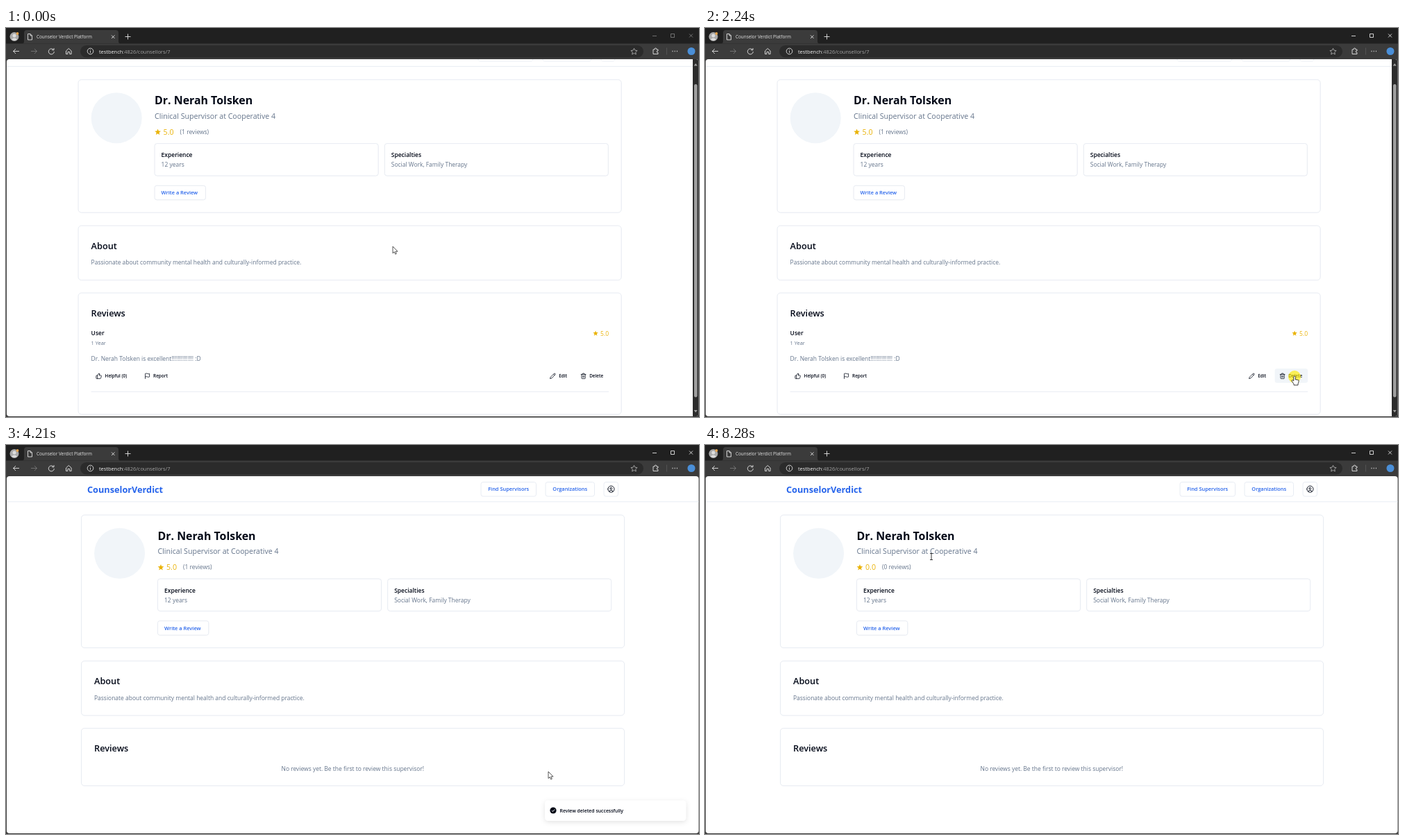
Recreate the animation shown at these times as an HTML page. Size 998 by 561 pixels, loop 8420 ms.

```html
<!DOCTYPE html>
<html lang="en">
<head>
<meta charset="utf-8">
<title>Counselor Verdict Platform</title>
<style>
  html, body { margin: 0; width: 100%; height: 100%; overflow: hidden; background: #3b3b3b; }
  svg { display: block; font-family: "Open Sans", "Noto Sans", sans-serif; fill: #020817; }
  .icon { fill: none; stroke: #020817; stroke-width: 2; stroke-linecap: round; stroke-linejoin: round; }
  .chrome { fill: none; stroke: #e4e4e4; stroke-width: .9; stroke-linejoin: round; }
  .card { filter: drop-shadow(0 .6px .6px #0000000d); }
  .toast { filter: drop-shadow(0 2px 3.5px #0000001c); }
</style>
</head>
<body>
<svg id="stage" width="998" height="561" viewBox="0 0 998 561"></svg>
<script>
const LOOP = 8420;
const MUTED = '#64748b', BLUE = '#2563eb', GOLD = '#eab308', LINE = '#e2e8f0', HOVER = '#f1f5f9';
const PERSON = 'Dr. Nerah Tolsken';
const HOST = 'testbench', LIST_PATH = ':4826/counsellors';

// Text sizes are in the site's own pixels; the screen is shown reduced.
const text = (x, y, size, str, attrs = '') =>
  `<text x="${x}" y="${y}" font-size="${size * .53}" ${attrs}>${str}</text>`;
const bold = (x, y, size, str, attrs = '') => text(x, y, size, str, 'font-weight="600" ' + attrs);
const fill = color => `fill="${color}"`;
const rect = (x, y, w, h, r, attrs) =>
  `<rect x="${x}" y="${y}" width="${w}" height="${h}" rx="${r}" ${attrs}/>`;
const box = (x, y, w, h, r = 3.5, attrs = 'class="card"') =>
  rect(x, y, w, h, r, `fill="#fff" stroke="${LINE}" stroke-width=".8" ${attrs}`);
const icon = (x, y, d, scale = .38) =>
  `<path class="icon" transform="translate(${x} ${y}) scale(${scale}) translate(-12 -12)" d="${d}"/>`;
const star = (x, y, scale) =>
  `<path fill="${GOLD}" transform="translate(${x} ${y}) scale(${scale}) translate(-12 -12)"
    d="M12 1l3 7.6 8 .6-6.2 5.2 2 7.8L12 18l-6.8 4.2 2-7.8L1 9.2l8-.6z"/>`;
const line = (x1, x2, y) => `<path d="M${x1} ${y}H${x2}" stroke="${LINE}" stroke-width=".8"/>`;
const group = (id, body, attrs = '') => `<g id="${id}" ${attrs}>${body}</g>`;

const THUMB = 'M7 10v12M15 6l-1 4h6a2 2 0 0 1 2 2.5l-2.5 8A2 2 0 0 1 17.5 22H4a2 2 0 0 1-2-2v-8a2 2 0 0 1 2-2h3l5-8a3 3 0 0 1 3 4z';
const FLAG = 'M4 22V3s1-1 4-1 5 2 8 2 4-1 4-1v12s-1 1-4 1-5-2-8-2-4 1-4 1';
const PENCIL = 'M21.2 6.8a1 1 0 0 0-4-4L3.8 16.2 2 22l5.8-1.8zM15 5l4 4';
const TRASH = 'M3 6h18M19 6v14q0 2-2 2H7q-2 0-2-2V6M8 6V4q0-2 2-2h4q2 0 2 2v2M10 11v6M14 11v6';
const ACCOUNT = 'M2 12a10 10 0 1 0 20 0a10 10 0 1 0-20 0M9 10a3 3 0 1 0 6 0a3 3 0 1 0-6 0M6.5 20q0-4 3.5-4h4q3.5 0 3.5 4';

const browser = `
  <rect width="998" height="561" fill="#3b3b3b"/>
  <rect width="998" height="22.5" fill="#202020"/>
  <path d="M23 22.5q3 0 3-3V7q0-4 4-4H158q4 0 4 4V19.5q0 3 3 3z" fill="#3b3b3b"/>
  <circle cx="12" cy="12.5" r="6.5" fill="#a9a9a9"/><circle cx="12" cy="11" r="2.5" fill="#ddd"/>
  <path d="M8 16.500q4-4 8 0-4 3-8 0z" fill="#ddd"/><circle cx="16.500" cy="8" r="1.900" fill="#e3a34e"/>
  <g class="chrome">
    <path d="M31.500 8.500h3.500l2.500 2.500v6h-6zM35 8.500v2.500h2.500"/>
    <path d="M152 10.500l4.500 4.500M156.500 10.500l-4.500 4.500M171.500 12.500h8M175.500 8.500v8"/>
    <path d="M19 33.500h-8.500M14 30l-3.500 3.500 3.500 3.500"/>
    <path d="M36 33.500h8.500M41 30l3.500 3.500-3.500 3.500" stroke="#777"/>
    <path d="M68.500 31.500a4 4 0 1 0 .8 2.500M69 29v2.800h-2.800"/>
    <path d="M86.500 33l3.800-3.500 3.800 3.500v4.500h-2.400v-3h-2.800v3h-2.400z"/>
  </g>
  ${rect(107, 25, 811, 17.5, 8.7, 'fill="#2b2b2b"')}
  <g class="chrome">
    <circle cx="121.500" cy="33.500" r="4.300"/><path d="M121.500 33v2.800M121.500 31v.9"/>
    <path d="M904.500 29.300l1.400 2.900 3.200.4-2.400 2.200.6 3.200-2.800-1.600-2.800 1.600.6-3.200-2.400-2.200 3.200-.4z" stroke="#aaa"/>
    <path d="M932 31h2.200q-.5-2 1.300-2t1.300 2h2.200v2q-1.800-.3-1.800 1.200t1.800 1.200v2.100h-7z"/>
    <path d="M951.500 28.500v10" stroke="#555"/>
    <path d="M959.500 33.500h1M962.700 33.500h1M965.900 33.500h1" stroke-width="1.300"/>
  </g>
  <circle cx="987" cy="33.500" r="5.500" fill="#4a8fd8"/>
  <path id="controls" class="chrome" d="M931 11.500h6M957.500 8.500h5v5h-5zM984 8.500l5 5M989 8.500l-5 5"/>
  ${text(44, 15, 12, 'Counselor Verdict Platform', fill('#e4e4e4'))}
  ${text(134, 36.5, 14, `${HOST}<tspan id="path" fill="#a3a3a3"></tspan>`, fill('#f2f2f2'))}`;

const header = `
  ${line(0, 998, 81.8)}
  ${text(117, 69.3, 24, 'CounselorVerdict', `font-weight="700" fill="${BLUE}"`)}
  ${box(684, 53.5, 79.5, 20.5, 3, 'id="find"')}${bold(723.7, 66.3, 14, 'Find Supervisors', `text-anchor="middle" fill="${BLUE}"`)}
  ${box(777, 53.5, 70.5, 20.5, 3, '')}${bold(812.2, 66.3, 14, 'Organizations', `text-anchor="middle" fill="${BLUE}"`)}
  ${box(861, 53.5, 20.5, 20.5, 3, '')}${icon(871.4, 63.6, ACCOUNT, .46)}`;

const review = `
  ${box(108.5, 408.5, 782, 175, 4.5)}
  ${bold(127, 469.8, 16, 'User')}${text(127, 483.9, 14, '1 Year', fill(MUTED))}
  ${star(853.5, 466.6, .34)}${text(872.4, 470, 16, '5.0', `text-anchor="end" fill="${GOLD}"`)}
  ${text(127, 506.3, 16, PERSON + ' is excellent' + '!'.repeat(14) + ' :D', fill(MUTED))}
  ${rect(825, 517.7, 47.5, 20.5, 3, 'id="trash" fill="none"')}
  ${icon(138, 528.3, THUMB)}${bold(147, 530.8, 12, 'Helpful (0)')}
  ${icon(208, 528.3, FLAG)}${bold(216.5, 530.8, 12, 'Report')}
  ${icon(791.7, 528.3, PENCIL)}${bold(800.7, 530.8, 12, 'Edit')}
  ${icon(836, 528.3, TRASH)}${bold(844.6, 530.8, 12, 'Delete')}
  ${line(127, 872.4, 551)}`;

const noReviews = box(108.5, 408.5, 782, 83, 4.5) +
  text(499.3, 469.7, 16, 'No reviews yet. Be the first to review this supervisor!', `text-anchor="middle" fill="${MUTED}"`);

const detail = `
  ${box(108.5, 101, 782, 191.5, 4.5)}
  <circle cx="163.600" cy="156.200" r="36.500" fill="${HOVER}"/>
  ${text(218.5, 136.8, 30, PERSON, 'font-weight="700"')}
  ${text(218.5, 157.4, 20, 'Clinical Supervisor at Cooperative 4', fill(MUTED))}
  ${star(223, 176.3, .4)}${text(231, 180, 20, '', `id="score" fill="${GOLD}"`)}
  ${text(255, 179.2, 16, '', `id="count" fill="${MUTED}"`)}
  ${box(218.5, 193, 322, 46.5)}${bold(228, 212.8, 16, 'Experience')}${text(228, 226.6, 16, '12 years', fill(MUTED))}
  ${box(549.7, 193, 322, 46.5)}${bold(559.2, 212.8, 16, 'Specialties')}${text(559.2, 226.6, 16, 'Social Work, Family Therapy', fill(MUTED))}
  ${box(218.5, 253.7, 73.3, 20.5, 3)}${bold(228, 266.6, 14, 'Write a Review', fill(BLUE))}
  ${box(108.5, 311.5, 782, 78.5, 4.5)}
  ${bold(127, 345, 24, 'About')}
  ${text(127, 367.8, 16, 'Passionate about community mental health and culturally-informed practice.', fill(MUTED))}
  ${group('review', review)}${group('noReviews', noReviews)}
  ${bold(127, 442, 24, 'Reviews')}`;

const scrollbar = `
  <rect x="989" y="45" width="9" height="515" fill="#2c2c2c"/>
  ${rect(991, 81, 4.5, 451.5, 2.2, 'fill="#9f9f9f"')}
  <path d="M990.700 54.500h5l-2.500-3.500zM990.700 551h5l-2.500 3.500z" fill="#9f9f9f"/>`;

const dialog = `
  ${rect(353, 251.7, 293, 101.8, 4.5, 'fill="#fff"')}
  ${bold(367.3, 278, 18, 'Delete Review')}
  ${text(367.3, 295.2, 14, 'Are you sure you want to delete this review? This action cannot be', fill(MUTED))}
  ${text(367.3, 306.5, 14, 'undone.', fill(MUTED))}
  ${box(542, 318.7, 43.5, 20.5, 3, 'id="cancel"')}${bold(563.7, 331.6, 14, 'Cancel', 'text-anchor="middle"')}
  ${rect(590, 318.5, 41.8, 21, 3, 'fill="#ef4444"')}${bold(610.9, 331.6, 14, 'Delete', 'text-anchor="middle" fill="#fff"')}`;

const toast = `
  ${rect(776, 512.5, 203.5, 29.5, 4.5, 'class="toast" fill="#fff"')}
  <circle cx="788" cy="527" r="4.600"/><path d="M786 527.200l1.500 1.400 2.700-3" fill="none" stroke="#fff"/>
  ${bold(797.5, 530, 13, 'Review deleted successfully')}`;

const status = rect(0, 547.8, 88, 13.2, 2, 'fill="#2b2b2b"') +
  text(3.5, 556.6, 12, HOST + LIST_PATH, fill('#eee'));

const pointers = {
  arrow: '<path d="M0 0V9.800L2.200 7.800 3.700 11.200 5.300 10.500 3.900 7.200H7z" fill="#fff" stroke="#111" stroke-width=".7"/>',
  hand: `<path d="M0 0C-1.300 0-1.300 1-1.300 1.500V7l-1.200-1c-1-.7-2 .3-1.300 1.300L-1 11.500V13H5V11c.8-1.500 1-2.500 1-4.500 0-1-1.300-1.200-1.600-.6
    0-1-1.500-1.200-1.700-.4 0-1-1.400-1.100-1.500-.3V1.500C1.200 1 1.200 0 0 0z" fill="#fff" stroke="#111" stroke-width=".8"/>`,
  beam: '<path d="M-2-4.500H2M0-4.500V4.500M-2 4.500H2" stroke="#222" stroke-width=".9"/>'
};

const stage = document.getElementById('stage');
stage.innerHTML = `
  <clipPath id="view"><rect x="1" y="45" width="996.500" height="515" rx="4"/></clipPath>
  ${browser}
  <g clip-path="url(#view)">
    <rect y="45" width="998" height="516" fill="#fff"/>
    ${group('page', header + group('detail', detail) + group('loading',
      text(499.3, 111, 16, 'Loading supervisors...', 'text-anchor="middle"')))}
    ${group('scrollbar', scrollbar)}
    ${group('toast', toast)}
    <rect id="overlay" y="45" width="998" height="516" fill="#000"/>
    ${group('dialog', dialog)}
  </g>
  ${group('status', status)}
  <g id="cursor"><circle id="click" cy="1" r="9" fill="#ffeb00" opacity=".65"/>
    ${Object.entries(pointers).map(([id, body]) => group(id, body)).join('')}</g>`;

const el = {};
stage.querySelectorAll('[id]').forEach(node => el[node.id] = node);
const show = (name, on) => el[name].setAttribute('visibility', on ? 'inherit' : 'hidden');
const set = (name, attr, value) => el[name].setAttribute(attr, value);

// time, x, y, pointer shape held until the next stop
const stops = [
  [0, 557, 315, 'arrow'], [700, 846, 502, 'hand'], [900, 846, 502, 'arrow'], [1100, 846, 502, 'arrow'],
  [1540, 564, 332, 'hand'], [1900, 564, 332, 'arrow'], [2220, 849, 502, 'hand'], [2300, 849, 502, 'arrow'],
  [2520, 849, 502, 'arrow'], [2800, 612, 329, 'hand'], [2905, 612, 329, 'arrow'], [3080, 624, 329, 'arrow'],
  [3510, 624, 329, 'arrow'], [4210, 781, 471, 'arrow'], [4490, 791, 495, 'arrow'], [4630, 790, 493, 'arrow'],
  [5050, 234, 177, 'beam'], [5190, 240, 177, 'arrow'], [5610, 731, 70, 'hand'], [5750, 731, 61, 'hand'],
  [6030, 731, 61, 'arrow'], [6730, 416, 307, 'hand'], [7500, 416, 307, 'arrow'], [8000, 416, 307, 'arrow'],
  [8140, 253, 178, 'beam'], [8280, 326, 161, 'beam'], [LOOP, 326, 161, 'beam']
];
const clicks = [840, 1820, 2240, 2800, 5750, 7430];

const clamp = v => Math.max(0, Math.min(1, v));
const smooth = v => v * v * (3 - 2 * v);
const easeOut = v => 1 - (1 - v) ** 2;
const ramp = (t, start, length) => easeOut(clamp((t - start) / length));

function step(t) {
  const [start, last] = t < 3510 ? [0, 3220] : t < 8140 ? [3510, 7850] : [8140, 8280];
  return Math.min(last, start + Math.floor((t - start) / 140) * 140);
}

function render(t) {
  const deleted = t >= 3500, loading = t >= 5780 && t < 7500, fresh = t >= 7500;
  const [opened, closed] = t < 2300 ? [900, 1900] : [2300, 2905];
  const shade = ramp(t, opened, 200) - ramp(t, closed, 200);

  set('controls', 'opacity', t < 840 ? .45 : 1);
  el.path.textContent = LIST_PATH + (loading ? '' : '/7');
  set('page', 'transform', deleted ? '' : 'translate(-4.4 -26.4)');
  show('detail', !loading);
  show('loading', loading);
  show('review', !deleted && !loading);
  show('noReviews', deleted && !loading);
  el.score.textContent = fresh ? '0.0' : '5.0';
  el.count.textContent = fresh ? '(0 reviews)' : '(1 reviews)';
  show('scrollbar', !deleted && shade <= 0);
  show('status', t >= 5740 && t < 6300);

  set('overlay', 'opacity', shade * .8);
  set('dialog', 'opacity', shade);
  set('dialog', 'transform', `translate(499.5 ${302.6 + 2 * (1 - shade)}) scale(${.95 + .05 * shade}) translate(-499.5 -302.6)`);

  const raised = ramp(t, 3450, 400) - ramp(t, 7480, 300);
  set('toast', 'opacity', raised);
  set('toast', 'transform', `translate(0 ${30 * (1 - raised)})`);

  const i = stops.findIndex(s => s[0] > t) - 1;
  const [t0, x0, y0, shape] = stops[i], [t1, x1, y1] = stops[i + 1];
  const p = smooth((t - t0) / (t1 - t0));
  const x = x0 + (x1 - x0) * p, y = y0 + (y1 - y0) * p;
  set('cursor', 'transform', `translate(${x} ${y})`);
  for (const name in pointers) show(name, name === shape);
  show('click', clicks.some(c => t >= c && t < c + 140));

  const hand = shape === 'hand';
  set('trash', 'fill', hand && y > 490 ? HOVER : 'none');
  set('cancel', 'fill', hand && t < 1900 ? HOVER : '#fff');
  set('find', 'fill', hand && y < 75 ? HOVER : '#fff');
}

function tick() {
  render(step(performance.now() % LOOP));
  requestAnimationFrame(tick);
}
tick();
</script>
</body>
</html>
```
